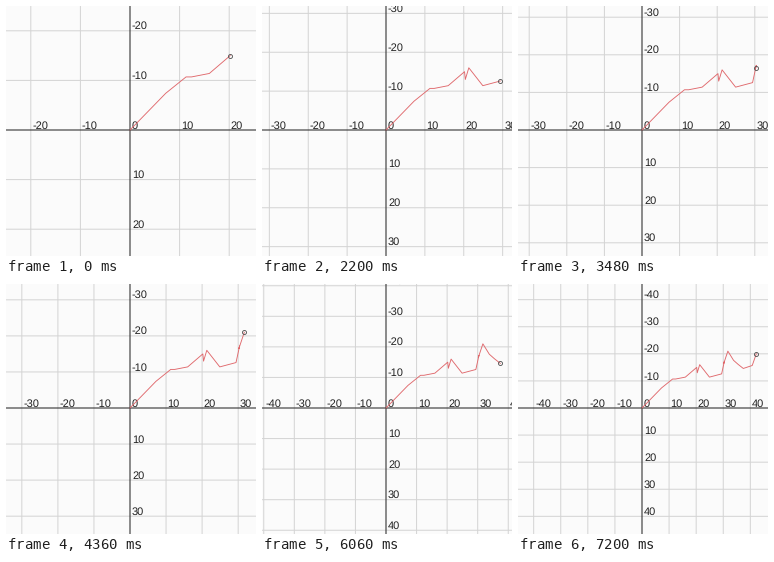
Write a matplotlib script that moves like this. It is 250x250 px and loops after 7.24 s.

```python
import numpy as np
import matplotlib.pyplot as plt
from matplotlib.animation import FuncAnimation
from matplotlib.collections import LineCollection

SIZE, DPI = 250, 100
MID = SIZE / 2 - 1     # pixel position of the origin
EDGE = 114.3           # farthest the head may get from the origin
SPAN = 25              # smallest range shown on either side
LOOP, STEP = 7240, 20  # ms
FIRST, PERIOD = 420, 587
PX = 72 / DPI          # one pixel in points

# corners of the walk as x + y*i
WALK = np.array([
    0, 7.2+7.4j, 11.3+10.7j, 12.4+10.7j, 16+11.4j, 20.2+15j,
    20.4+13j, 21.3+16j, 24.9+11.4j, 29.4+12.6j, 30.4+17.2j, 30.2+16.5j,
    31.7+21j, 33.8+17.6j, 35.5+16.1j, 37.4+14.6j, 40.7+15.7j, 42.2+20j])
SHOWN = 6              # corners already reached when the loop begins
TICKS = range(-40, 41, 10)

plt.rcParams.update({"font.family": "Liberation Sans",
                     "text.hinting": "none", "path.snap": False})
fig = plt.figure(figsize=(SIZE / DPI, SIZE / DPI), dpi=DPI,
                 facecolor="#fbfbfb")
ax = fig.add_axes([0, 0, 1, 1])
ax.set_xlim(0, SIZE)
ax.set_ylim(SIZE, 0)
ax.axis("off")


def cross(p):
    return [[(p, 0), (p, SIZE)], [(0, p), (SIZE, p)]]


def lines(segments, color, width, z):
    art = LineCollection(segments, colors=color, linewidths=width * PX,
                         zorder=z)
    return ax.add_collection(art)


def label(value):
    return ax.text(0, 0, str(value), size=11 * PX, color="#222222",
                   ha="left", va="baseline", zorder=3)


def place(text, x, y):
    text.set_position((x, y))
    text.set_visible(-18 < x < SIZE and 0 < y < SIZE + 8)


grid = lines([], "#d4d4d4", 1, 1)
lines(cross(MID), "#333333", 1.1, 2)
path, = ax.plot([], [], color="#e0686c", lw=0.9 * PX, zorder=4)
head, = ax.plot([], [], "o", ms=4 * PX, mfc="none", mec="#555555",
                mew=0.9 * PX, zorder=5)
x_labels = {v: label(v) for v in TICKS}
y_labels = {v: label(v) for v in TICKS if v}


def draw(i):
    jumps = max(0, (i * STEP - FIRST) // PERIOD + 1)
    walked = WALK[:SHOWN + jumps]
    scale = min(MID / SPAN, EDGE / walked.real.max())

    for v in TICKS:
        place(x_labels[v], MID + v * scale + 1.5, MID - 1.5)
        if v:
            place(y_labels[v], MID + 2, MID + v * scale - 1.5)
    grid.set_segments([seg for v in y_labels
                       for seg in cross(MID + v * scale)])

    x, y = MID + walked.real * scale, MID - walked.imag * scale
    path.set_data(x, y)
    head.set_data(x[-1:], y[-1:])
    return [grid, path, head]


anim = FuncAnimation(fig, draw, frames=LOOP // STEP, interval=STEP,
                     init_func=lambda: draw(0), repeat=True,
                     repeat_delay=0, blit=False)
plt.show()
```
